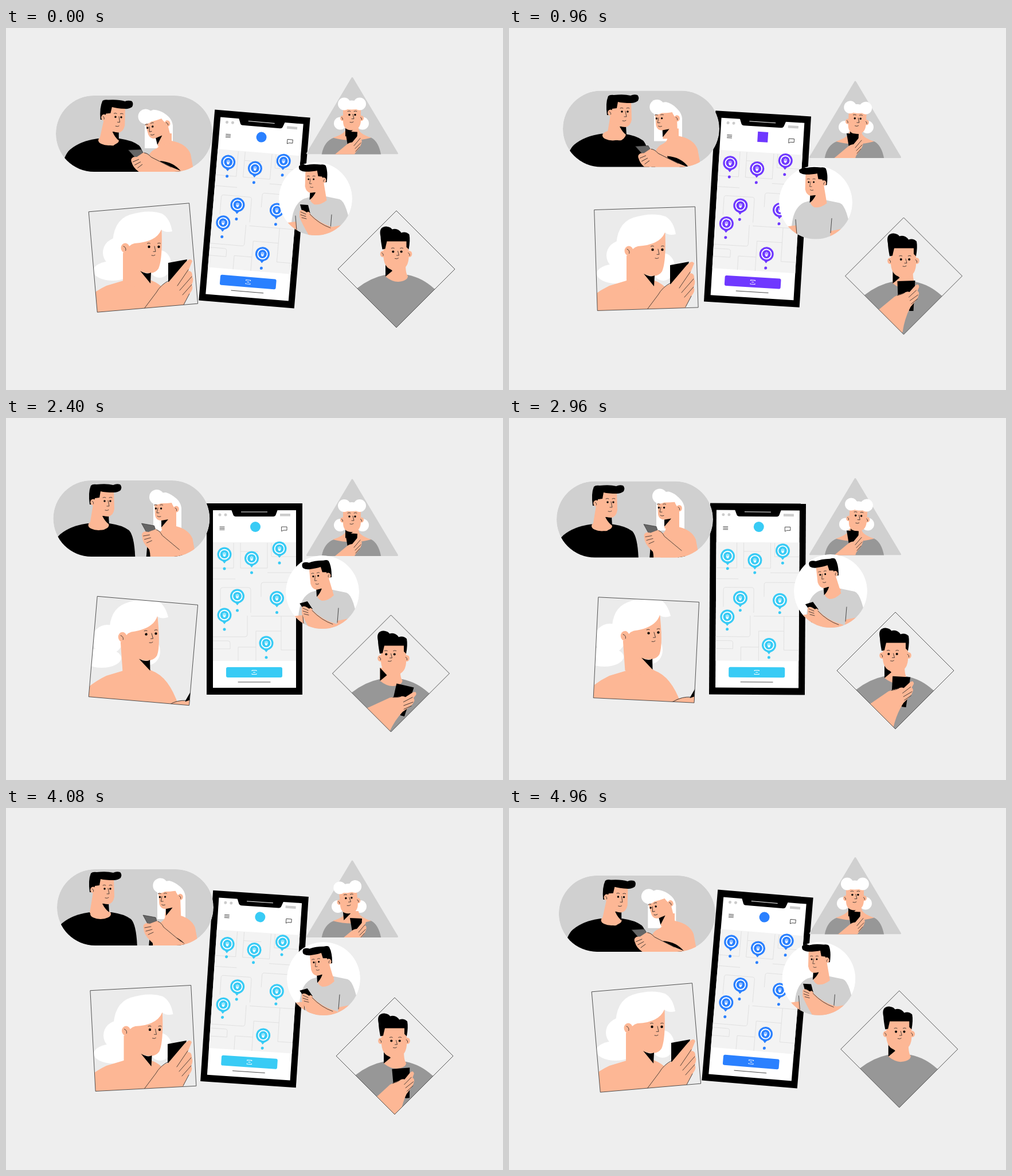
An HTML page for the animation above (5000 ms loop, 867 by 632 pixels).

```html
<!DOCTYPE html>
<html lang="en">
<head>
<meta charset="utf-8">
<title>People around a phone</title>
<style>
html, body { margin: 0; height: 100%; overflow: hidden; background: #eee; }
svg { display: block; width: 100%; height: 100%; }
.skin { fill: #fdb795; }
.hair { fill: #fff; }
.pale { fill: #d0d0d0; }
.grey { fill: #979797; }
.line { fill: none; stroke: #222; stroke-width: .8; stroke-linecap: round; stroke-linejoin: round; }
.icon { fill: none; stroke: #fff; stroke-width: 1; }
.ring { fill: none; stroke: #fff; stroke-width: 1.9; }
.thin { fill: none; stroke: #444; stroke-width: .9; }
</style>
</head>
<body>
<svg id="stage" viewBox="0 0 867 632"></svg>
<script>
const LOOP = 5000;
const stage = document.getElementById('stage');

// eyes sit d either side of the centre, the mouth m below it, dir is the way the nose points
const face = (x, y, d, m, dir = 1) => `<g transform="translate(${x} ${y}) scale(${dir} 1)">
  <circle cx="${-d}" r="${1.1 + d * .13}"/><circle cx="${d}" r="${1.1 + d * .13}"/>
  <path class="line" d="M${-d - 3} -6q3 -1.5 5 0M${d - 2} -6q3 -1.5 5 0M1 -1l2 ${m * .62}h-4M-4 ${m}q4 1.4 6 -.6"/></g>`;

const ear = (x, y, r = 4.8) => `<ellipse class="skin" cx="${x}" cy="${y}" rx="${r}" ry="${r * 1.15}"/>
  <path class="line" d="M${x - r * .4} ${y - r * .4}q${r * .7} ${r * .3} ${r * .5} ${r}"/>`;

const ball = (x, y, rx, ry = rx) => `<ellipse class="hair" cx="${x}" cy="${y}" rx="${rx}" ry="${ry}"/>`;
const shape = (cls, d) => `<path class="${cls}" d="${d}"/>`;

const manHead =
  shape('skin', 'M-14 0L-21 42Q-8 52 4 50Q14 44 12 34L9 20Z') +
  shape('', 'M1 26L12 25L13 41Q6 36 1 26Z') +
  shape('skin', 'M-14 -20H21L22 14Q20 26 11 27Q0 27 -8 19L-14 10Z') +
  shape('', 'M-21 6Q-24 -15 -19 -27Q-16 -30 -9 -29Q9 -31 20 -28Q26 -31 32 -29Q36 -25 33 -19Q28 -15 21 -15Q6 -15 -2 -17L-4 -6L-12 -5L-14 6Z') +
  ear(-15, 2) + face(10, 0, 5, 16);

const pins = [[381, 263], [428.5, 270], [477, 253], [403.5, 336], [472.5, 339.5], [381, 369], [454, 418]];
const pin = ([x, y]) => `<g transform="translate(${x} ${y})"><circle r="2.5" fill="currentColor"/>
  <g class="pin"><path d="M-4 11L0 16L4 11Z" fill="currentColor"/><circle r="12.5" fill="currentColor"/>
  <circle r="8.3" class="ring"/>
  <path class="icon" d="M-2 -3V1M0 -4V1M2 -3V1"/>
  <path fill="#fff" d="M-2.8 .5H2.8L1.2 4H-1.2Z"/></g></g>`;

const phone = `<g id="phone">
  <path d="M350 149H517V483H350Z"/>
  <path fill="#fff" d="M361 161H506V471H361Z"/>
  <path fill="#f3f3f3" d="M361 217H506V424H361Z"/>
  <path fill="none" stroke="#dcdcdc" stroke-width=".8" d="M361 262H397V218M409 218V262H456V218M409 233H440M456 270H506M463 218V242H506
    M374 330V300Q374 296 378 296H423Q427 296 427 300V340M445 312V291Q445 287 449 287H506M421 345V378Q421 382 417 382H361
    M361 389H387Q391 389 391 393V403H361M436 424V372H480M480 346V405H506M361 281H400M427 346H506M405 424V400H436"/>
  <path d="M393 160L396 168Q397 172 401 172H466Q470 172 471 168L474 160Z"/>
  <path class="icon" d="M410 164H456"/>
  <g fill="#ccc"><circle cx="373" cy="169" r="2.5"/><circle cx="383" cy="169" r="2.5"/><path d="M478 167H496V171.500H478Z"/></g>
  <path class="line" d="M373 190H381M373 192.500H381M373 195H381M481 190H490V196H484L481 197.500Z"/>
  <rect id="badge" x="426" y="181" width="18" height="18" fill="currentColor"/>
  ${pins.map(pin).join('')}
  <rect x="384" y="435" width="98" height="18" rx="3" fill="currentColor"/>
  <path class="icon" d="M429 442V440.500H437V442M429 446V447.500H437V446M431 444H435"/>
  <path class="line" d="M405 461H461"/>
</g>`;

const pill = `<g id="pill" clip-path="url(#pillClip)">
  <rect class="pale" width="273" height="133" rx="66.5"/>
  <g id="manBody">
    ${shape('', 'M-6 140Q0 104 12 94Q30 79 60 75H98Q120 78 132 87Q142 97 143 140Z')}
    <ellipse class="skin" cx="79" cy="78" rx="18" ry="9"/>
  </g>
  <g id="manHead">${manHead}</g>
  <g id="longHair">${shape('hair', 'M-18 -10Q0 -25 12 -23Q29 -15 31 0V40H-18Z')}</g>
  <g id="girlBody">
    ${shape('skin', 'M163 140Q164 100 182 93Q192 88 190 80L193 66H210V79Q236 84 243 102L250 140Z')}
    ${shape('', 'M190 114Q216 116 229 136H214Q205 124 192 122ZM164 112q6 12 5 24h-7z')}
  </g>
  <g id="girlHead">
    ${shape('skin', 'M-16 -10H22V36H-4L-2 21Q-13 22 -15 12Z')}
    ${shape('', 'M-4 21L8 19L-4 33Z')}
    ${ball(-12, -20, 13)}
    ${shape('hair', 'M-18 -12Q-14 -28 4 -28Q24 -22 30 0L24 6Q16 -4 14 -10Q0 -8 -16 -10Z')}
    ${ear(22, 1)}${face(-9, 0, 4.6, 14, -1)}
  </g>
  <g id="girlArm">
    <path fill="#666" stroke="#222" stroke-width=".6" d="M154 75L176 79L180 91L166 97Z"/>
    ${shape('skin', 'M155 98Q153 91 160 89L166 90L179 85Q186 87 190 96L222 122L262 150L215 152Q178 132 166 119Q155 108 155 98Z')}
    ${shape('line', 'M157 97L168 95M159 103L170 100M163 109L172 105M180 86Q186 88 190 96L220 121')}
  </g>
</g>`;

const triangle = `<g id="tri" clip-path="url(#triClip)">
  <path class="pale" stroke="#d0d0d0" stroke-width="3" stroke-linejoin="round" d="M0 -133L78.500 -1.500H-78.500Z"/>
  <g id="bunsBack">${ball(-21, -54, 11)}${ball(18, -54, 11)}</g>
  ${shape('grey', 'M-54 5Q-51 -22 -32 -29L0 -34L33 -29Q47 -22 51 5Z')}
  ${shape('skin', 'M-34 -29Q-11 -36 -11 -46H11Q11 -36 33 -29Q0 -20 -34 -29Z')}
  <g id="bunsHead">
    ${shape('', 'M-12 -47V-31L1 -42Z')}
    ${shape('skin', 'M-16 -84H15V-58Q14 -42 -1 -42Q-16 -42 -16 -58Z')}
    ${ear(-17, -63, 4)}${ear(16, -63, 4)}
    ${ball(-14, -88, 11)}${ball(13, -88, 11)}${ball(-1, -86, 17, 8)}
    ${face(0, -69, 5, 13)}
  </g>
  <g id="bunsArm">
    ${shape('', 'M-12 -40L9 -39L8 -18L-8 -16Z')}
    ${shape('skin', 'M-42 10L-12 -15Q-6 -21 0 -21L10 -33Q15 -38 16 -33L14 -27Q18 -26 16 -19L13 -12L5 -2Q2 4 2 14H-42Z')}
    ${shape('line', 'M3 -15L14 -28M5 -10L15 -20M6 -5L13 -13')}
  </g>
</g>`;

const circle = `<g id="disc" clip-path="url(#discClip)">
  <circle r="64" fill="#fff"/>
  ${shape('pale', 'M-46 70L-41 34Q-37 8 -20 0L-6 -4H18L42 1Q56 6 64 70Z')}
  ${shape('skin', 'M-50 42L-34 40L-30 70H-50ZM26 50L46 46L42 70H24Z')}
  <ellipse class="skin" cx="5" cy="-2" rx="13" ry="5"/>
  ${shape('line', 'M28 28L26 53M-35 30L-33 56')}
  <g id="discHead"><g transform="scale(-.88 .88)">${manHead}</g></g>
  <g id="discArm">
    <g id="discPhone">${shape('', 'M-27 10L-13 11L-9 27L-23 25Z')}</g>
    ${shape('skin', 'M-28 22Q-26 18 -20 21L-15 24Q-12 20 -8 28Q8 44 34 51L44 80H-2Q-22 48 -28 32Z')}
    ${shape('line', 'M-26 23L-17 27M-26 28L-17 31M-24 33L-16 35M-10 27Q6 44 26 51')}
  </g>
</g>`;

const rhombus = 'M0 -102L102 0L0 102L-102 0Z';
const diamond = `<g id="dia"><g clip-path="url(#diaClip)">
  ${shape('grey', 'M-110 110Q-100 50 -68 33Q-45 15 -20 10H20Q45 15 66 34Q100 50 110 110Z')}
  ${shape('skin', 'M-19 -10V13Q-6 23 4 22Q20 20 20 12Q16 8 16 -10Z')}
  ${shape('', 'M-19 -10L-7 3L-19 13Z')}
  <g id="diaHead">
    ${shape('skin', 'M-23 -22H21V12Q19 33 0 33Q-21 33 -23 10Z')}
    ${ear(-24, 4)}${ear(22, 4)}
    ${shape('', 'M-25 -4Q-28 -20 -28 -26Q-32 -44 -18 -44Q-10 -43 -8 -39Q2 -42 8 -33Q16 -36 22 -30Q24 -20 21 -4L17 -8V-18H-17Q-19 -10 -20 -5Z')}
    <g id="diaFace">${face(0, 0, 7.2, 12)}</g>
  </g>
  <g id="diaArm">
    ${shape('', 'M-11 9L20 8L17 61L10 61L-10 36Z')}
    ${shape('skin', 'M-45 60L-16 36Q-8 32 0 30Q6 26 10 28L20 17Q26 12 27 19L24 26Q28 28 26 34Q25 38 22 42L12 54Q2 72 -2 98L-60 130L-90 96Z')}
    ${shape('line', 'M9 37L22 25M11 43L25 33M13 49L24 40M-11 34Q-2 32 2 29')}
  </g></g>
  <path class="thin" d="${rhombus}"/>
</g>`;

const frame = 'x="-88" y="-88" width="176" height="176"';
const square = `<g clip-path="url(#boxClip)">
  <path fill="#ebebeb" d="M130 290H350V520H130Z"/>
  <g id="boxHair">${ball(-62, 10, 27, 26)}${ball(-72, 42, 34, 17)}${ball(10, 30, 20, 24)}</g>
  ${shape('skin', 'M130 520V482Q150 462 175 450L205 441Q240 430 254 441Q285 452 302 505V520Z')}
  <g id="boxHead">
    ${shape('skin', 'M-54 -40H13Q16 20 8 38Q0 50 -20 44L-6 62Q-20 80 -54 62Z')}
    ${shape('', 'M-24 42Q-12 49 -5 45L-6 64Z')}
    ${shape('hair', 'M-72 12Q-76 -45 -42 -56Q-10 -66 14 -58Q28 -50 32 -27Q20 -24 13 -30Q4 -8 -34 -6Q-44 -4 -50 10Z')}
    ${ear(-50, 2, 7.5)}${face(0, 0, 8.5, 15)}
  </g>
  <g id="boxArm">
    ${shape('', 'M283 410L316 404L306 440L283 446Z')}
    ${shape('skin', 'M190 560L262 462Q272 445 284 443L312 410Q322 400 325 407L318 424Q326 424 325 434Q328 440 324 448Q328 455 320 464L310 483L314 560Z')}
    ${shape('line', 'M238 494L262 462Q270 448 284 441M299 450L318 422M303 458L324 434M308 466L324 448M320 464L310 483')}
  </g></g>
  <rect class="thin" id="boxEdge" ${frame}/>`;

stage.innerHTML = `<defs>
  <clipPath id="pillClip"><rect width="273" height="133" rx="66.5"/></clipPath>
  <clipPath id="triClip"><path d="M-81 0V-140H81V0Z"/></clipPath>
  <clipPath id="discClip"><circle r="64"/></clipPath>
  <clipPath id="diaClip"><path d="${rhombus}"/></clipPath>
  <clipPath id="boxClip"><rect id="boxMask" ${frame}/></clipPath>
</defs>${phone}${pill}${triangle}${circle}${diamond}${square}`;

// two clocks: the whole loop, and a sway that runs twice per loop
const SLOW = { period: LOOP, times: [0, 960, 1760, 2400, 2960, 4080] };
const SWAY = { period: LOOP / 2, times: [0, 460, 960, 1580, 1760, 2400] };

// smooth periodic curve through the given values
function curve(v, t, { period, times }) {
  if (!Array.isArray(v)) return v;
  const n = times.length;
  t %= period;
  let i = n - 1;
  while (times[i] > t) i--;
  const T = k => times[(k + n) % n] + Math.floor(k / n) * period;
  const V = k => v[(k + n) % n];
  const slope = k => (V(k + 1) - V(k - 1)) / (T(k + 1) - T(k - 1));
  const h = T(i + 1) - T(i), u = (t - T(i)) / h, w = 1 - u;
  return V(i) * w * w * (1 + 2 * u) + V(i + 1) * u * u * (3 - 2 * u)
    + h * u * w * (slope(i) * w - slope(i + 1) * u);
}

const boxMove = { x: 239.4, y: [401, 402.7, 405.7, 406.5, 405, 402], r: [-4.9, -1.8, 3.1, 4.9, 2.8, -3] };
const boxY = [382, 387, 385, 377, 375, 387];

const moves = {
  phone: { r: [4.8, 3.5, .6, 0, .35, 3.8], o: '433.5 316' },
  pill: { x: [87, 94, 89, 82.5, 83, 89], y: [118, 109.5, 105, 109, 110.5, 107] },
  manBody: { x: [13, 8, -1, 0, 0, -3] },
  manHead: { x: [99, 98, 80, 84.5, 84, 78], y: [37, 36.5, 35.5, 36, 36.5, 34], r: [3, 0, 0, 0, 0, 0] },
  longHair: { x: [173, 177, 192.5, 192.5, 192, 193], y: [52, 48, 44, 48, 46, 47] },
  girlBody: { x: [-8, -8, -1, 0, 0, -2] },
  girlHead: { x: [173, 177, 192.5, 192.5, 192, 193], y: [53, 48, 44, 49, 46, 48], r: [-14, -2, 0, 0, 0, -2] },
  girlArm: { x: [-25, -25, 4, 0, -2, -4], y: [17, 19, 0, 0, 0, 5], r: [-13, -13, 4, 0, 0, 0], o: '166 88' },
  tri: { x: 604, y: [220.5, 227, 238, 241, 239.5, 226] },
  bunsBack: { x: [0, 4, 3, -4, -5, 0], clock: SWAY },
  bunsHead: { x: [0, 4, 3, -4, -5, 0], r: [0, 4, 3, -5, -6, 0], o: '0 -45', clock: SWAY },
  bunsArm: { x: [0, -3, -3, 8, 8, 0], y: [0, -3, -3, 6, 5, 0], clock: SWAY },
  disc: { x: [540, 535, 545, 552, 561, 554], y: [298, 304.5, 305.5, 304, 302, 298] },
  discHead: { x: [1, 1, -6, -3, -5, -4], y: [-34, -35.5, -30, -29, -30, -30], r: [0, 0, -8, -7, -8, -7] },
  discArm: { x: [0, 0, -5, -8, -12, -10], y: [0, 75, 3, 5, 8, 6] },
  discPhone: { r: [0, 0, 0, -20, -22, -20], o: '-16 26' },
  dia: { x: [681, 688.5, 678, 671.5, 674, 678], y: [421, 433, 446.5, 446, 441, 433] },
  diaHead: { x: [.5, .5, 2, 5.5, 1, 0], y: -30.5 },
  diaFace: { x: [1, 2, -3.5, -6.5, -5.5, 1.5], y: [0, 1.5, -1, -3, 1.5, 4] },
  diaArm: { x: [-10, 0, 1, 17, 5, 7], y: [105, 0, -1, 12, 2, 13], r: [0, 0, 4, 15, 5, -3], o: '4 22' },
  boxMask: boxMove,
  boxEdge: boxMove,
  boxHair: { x: [258, 259, 256, 239, 238, 259], y: boxY },
  boxHead: { x: [258, 259, 258, 253, 252, 259.5], y: boxY, r: [0, 0, -2, -4, -4, 0] },
  boxArm: { x: [0, -2, 19, 28, 31, -1], y: [0, 4, 24, 51, 45, 2], r: [0, 0, 22, 30, 30, 0], o: '283 446' }
};

const parts = Object.entries(moves).map(([id, m]) => [document.getElementById(id), m]);
const pinTops = [...document.querySelectorAll('.pin')];
const phoneEl = document.getElementById('phone');
const badge = document.getElementById('badge');

function draw(t) {
  for (const [el, { x = 0, y = 0, r = 0, o = '0 0', clock = SLOW }] of parts) {
    const [a, b, c] = [x, y, r].map(v => curve(v, t, clock).toFixed(2));
    el.setAttribute('transform', `translate(${a} ${b}) rotate(${c} ${o})`);
  }
  const lift = 23.25 + 1.75 * Math.cos(2 * Math.PI * (t / 1250 - .92));
  for (const p of pinTops) p.setAttribute('transform', `translate(0 ${-lift.toFixed(2)})`);

  const purple = t >= 640 && t < 2080, cyan = t >= 2080 && t < 4520;
  phoneEl.style.color = purple ? '#6f38ff' : cyan ? '#38cbf5' : '#2a80ff';
  badge.setAttribute('rx', purple ? 0 : 9);
}

const start = performance.now();
(function tick() {
  draw((performance.now() - start) % LOOP);
  requestAnimationFrame(tick);
})();
</script>
</body>
</html>
```
